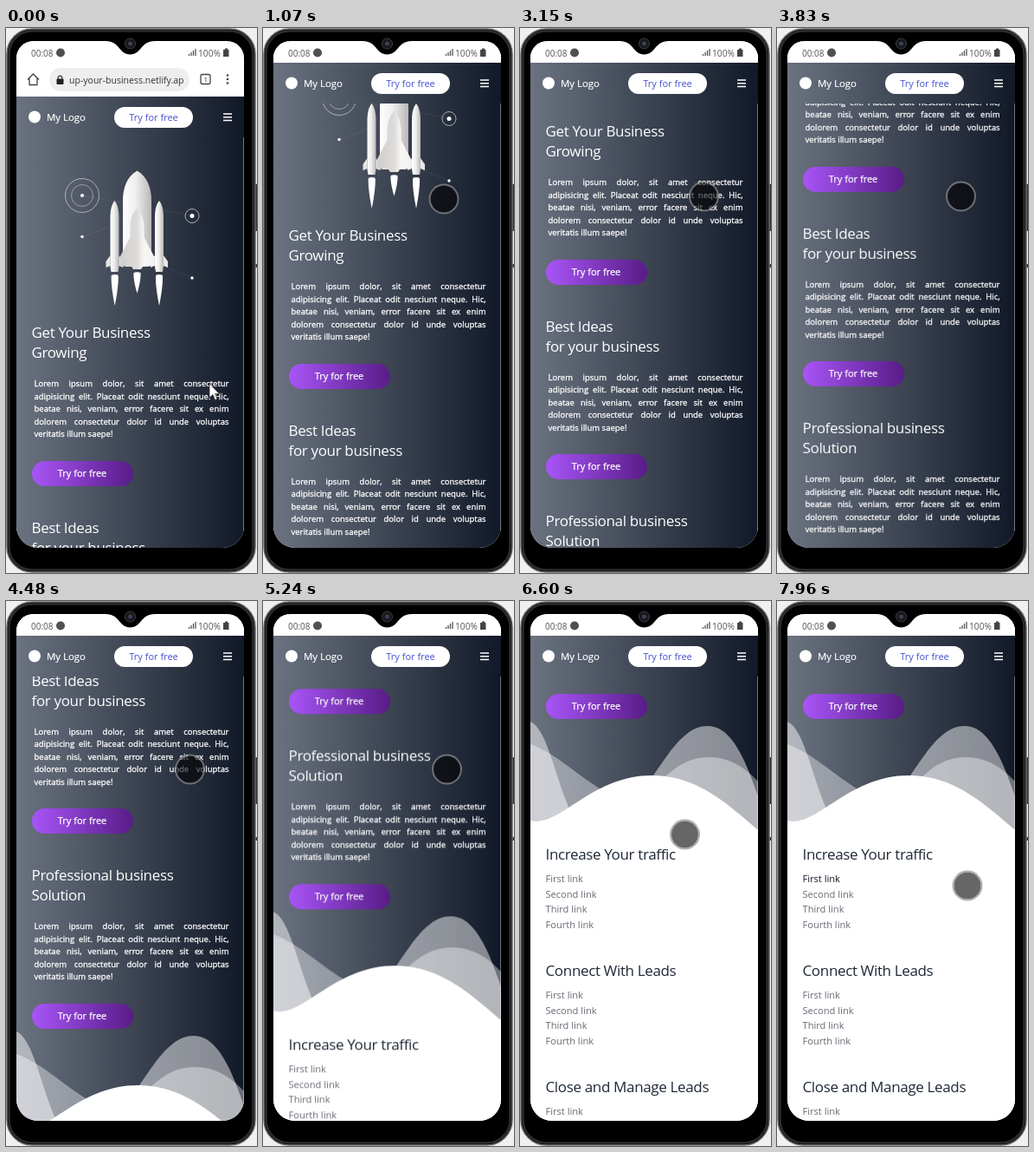
Recreate the animation shown at these times as an HTML page. Size 290x628 px, loop 8000 ms.

```html
<!DOCTYPE html>
<html lang="en">
<head>
<meta charset="utf-8">
<title>Mobile landing page</title>
<style>
html, body { margin: 0; width: 100%; height: 100%; overflow: hidden; background: #f0f0f0; }
body { position: relative; font-family: "Open Sans", "Noto Sans", sans-serif; }
svg { position: absolute; left: 0; top: 0; overflow: visible; }
#screen { position: absolute; left: 12px; top: 15px; width: 263px; height: 584px; overflow: hidden; border-radius: 20px 20px 25px 25px; background: #fff; }
#stage { position: absolute; left: -12px; top: -15px; width: 290px; height: 628px; }
#page, #bars { position: absolute; left: 0; top: 0; width: 290px; will-change: transform; }
.box { position: absolute; }
.night { background: linear-gradient(90deg, #6b7280, #111827); }
.text { position: absolute; height: 20px; line-height: 20px; white-space: nowrap; }
.heading { font-size: 17px; letter-spacing: -.35px; }
.line { width: 225px; font-size: 9.5px; color: #fff; text-align: justify; text-align-last: justify; -webkit-text-stroke: .3px #fff; }
.line.end { text-align-last: left; }
.button { position: absolute; text-align: center; border-radius: 15px; color: #fff; }
.buy { left: 29.5px; width: 117px; height: 29px; line-height: 28px; font-size: 11px; -webkit-text-stroke: .25px #fff; background: linear-gradient(90deg, #a855f7, #581c87); }
.link { color: #666b73; font-size: 11.1px; }
.link.hover { color: #111827; }
#touch { position: absolute; left: -17.5px; top: -17.5px; width: 31px; height: 31px; border: 2px solid rgba(140, 140, 140, .7); border-radius: 50%; background: rgba(0, 0, 0, .6); background-clip: padding-box; }
</style>
</head>
<body>
<svg width="290" height="628">
  <path d="M289 180V234M289 272V276" stroke="#333" stroke-width="2"/>
  <rect x="1" y="1" width="287" height="626" rx="29" fill="#000" stroke="#6a6b6d" stroke-width="1.5"/>
  <rect x="3.5" y="3.5" width="282" height="621" rx="26.5" fill="none" stroke="#2c2d2f" stroke-width="2.5"/>
</svg>

<div id="screen"><div id="stage">
  <div id="page">
    <div class="box night" style="left:12px;top:0;width:263px;height:1120px"></div>
    <div class="box" style="left:274px;top:0;width:1px;height:1120px;background:rgba(255,255,255,.4)"></div>
    <svg width="290" height="1500">
      <defs>
        <linearGradient id="hull"><stop stop-color="#fff"/><stop offset=".45" stop-color="#efeeed"/><stop offset="1" stop-color="#b9b8b7"/></linearGradient>
        <linearGradient id="shuttle"><stop stop-color="#cfcecd"/><stop offset=".5" stop-color="#dddcdb"/><stop offset=".7" stop-color="#f8f7f6"/><stop offset="1" stop-color="#f3f2f1"/></linearGradient>
        <g id="booster">
          <path d="M0 199C4 204 5 211 5 219V275L4 281H-4L-5 275V219C-5 211-4 204 0 199Z" fill="url(#hull)"/>
          <path d="M-5 262L-10 269V276L-5 274ZM5 262L10 269V276L5 274Z" fill="#e8e7e6"/>
        </g>
        <path id="flame" d="M-4 0Q0-2 4 0C4.500 10 2 25 0 35C-2 25-4.500 10-4 0Z" fill="#fff"/>
      </defs>
      <g fill="none" stroke="#fff">
        <path d="M88 193L215 216M88 241L151 216M151 262L215 288" stroke-width=".6" opacity=".12"/>
        <circle cx="88" cy="193" r="19.5" stroke-width=".7" opacity=".75"/>
        <circle cx="88" cy="193" r="12.5" stroke-width=".7" opacity=".6"/>
        <circle cx="215" cy="216.500" r="8" stroke-width=".8" opacity=".75"/>
      </g>
      <g fill="#fff">
        <circle cx="88" cy="193" r="2"/><circle cx="88" cy="240.500" r="1.700"/>
        <circle cx="215" cy="216.500" r="2.500"/><circle cx="215" cy="288" r="1.700"/>
      </g>
      <path d="M151.500 164.500C163 171 168 184 168 199V268L165 275H138L135 268V199C135 184 140 171 151.500 164.500Z" fill="url(#hull)"/>
      <use href="#booster" x="125.500"/><use href="#booster" x="177"/>
      <path d="M151.500 208C157 213 159.500 222 159.500 231V241L171 263V274L158 275L156 278H147L145 275L132 274V263L143.500 241V231C143.500 222 146 213 151.500 208Z" fill="url(#shuttle)"/>
      <use href="#flame" x="125.700" y="285"/><use href="#flame" x="177" y="285"/>
      <use href="#flame" transform="translate(151.500 282) scale(1 .68)"/>
      <g fill="#fff" transform="translate(0 719)">
        <path opacity=".38" d="M12 287C45 298 75 333 110 347C140 350 150 335 165 327C185 308 200 302 219 302C242 302 260 314 275 330V420H12Z"/>
        <path opacity=".48" d="M12 261C32 270 40 325 59 366C80 405 125 365 150 329C175 292 192 266 217 266C246 266 262 310 275 347V420H12Z"/>
        <path d="M12 375C45 384 82 323 152 323C205 323 240 356 275 386V1000H12Z"/>
      </g>
    </svg>
    <div id="copy"></div>
  </div>

  <div id="bars">
    <div class="box" style="left:12px;top:40px;width:263px;height:39px;background:#fff"></div>
    <div class="box" style="left:50px;top:46px;width:162px;height:27px;border-radius:14px;background:#eeeeef"></div>
    <div class="text" style="left:73px;top:49.500px;width:132px;overflow:hidden;font-size:10.5px;color:#333">up-your-business.netlify.app</div>
    <div class="box night" style="left:12px;top:79px;width:263px;height:47px"></div>
    <svg width="290" height="130">
      <g fill="none" stroke="#444" stroke-width="1.300">
        <path d="M25 59.500L31.500 53L38 59.500M27 58V65.500H36V58"/>
        <rect x="225" y="53.500" width="11" height="11" rx="2"/>
        <path d="M60.200 59V57.500A2.300 2.300 0 0 1 64.800 57.500V59"/>
      </g>
      <rect x="58.500" y="58.500" width="8" height="6.500" rx="1" fill="#222"/>
      <g fill="#444"><circle cx="256" cy="54.500" r="1.300"/><circle cx="256" cy="59" r="1.300"/><circle cx="256" cy="63.500" r="1.300"/></g>
      <circle cx="33" cy="102.500" r="7" fill="#fff"/>
      <path d="M251 99H261M251 102.800H261M251 106.600H261" stroke="#fff" stroke-width="1.500"/>
    </svg>
    <div class="text" style="left:228.500px;top:49px;font-size:8px;color:#222">1</div>
    <div class="text" style="left:47px;top:92.500px;font-size:11.400px;color:#fff;-webkit-text-stroke:.2px #fff">My Logo</div>
    <div class="button" style="left:125px;top:91px;width:91px;height:24px;line-height:23px;font-size:11px;background:#fff;color:#4650d0">Try for free</div>
  </div>

  <div class="box" style="left:12px;top:15px;width:263px;height:25px;background:#fff"></div>
  <div class="text" style="left:29px;top:18.500px;font-size:10px;color:#555">00:08</div>
  <div class="text" style="left:222px;top:18.500px;font-size:10.200px;color:#555">100%</div>
  <svg width="290" height="40">
    <circle cx="63" cy="28.500" r="5" fill="#505054"/>
    <path d="M211.500 32V30M214 32V28M216.500 32V26M219 32V24" stroke="#555" stroke-width="1.300"/>
    <path d="M251 25H253V23.500H256V25H257.500V33H251Z" fill="#444"/>
    <path d="M115 14V15C132 15 130 30.500 143.500 30.500C157 30.500 155 15 172 15V14Z"/>
  </svg>
  <div id="touch"></div>
  <svg id="arrow" width="290" height="628"><path d="M235 409.500V426L239 422.500L241.500 428.500L244 427.500L241.500 421.500H246.500Z" fill="#fff" stroke="#222" stroke-width=".7"/></svg>
</div></div>

<svg width="290" height="40">
  <circle cx="143.500" cy="18" r="6" fill="#17181b" stroke="#3d3f43"/>
  <circle cx="143.500" cy="18" r="2.500" fill="#3a4055"/>
</svg>

<script>
const $ = id => document.getElementById(id);
const text = (x, y, str, cls, style = '') =>
  `<div class="text ${cls}" style="left:${x}px;top:${y - 10}px;${style}">${str}</div>`;
const heading = (y, str, color) => text(29.5, y, str, 'heading', `color:${color}`);

const lorem = [
  'Lorem ipsum dolor, sit amet consectetur',
  'adipisicing elit. Placeat odit nesciunt neque. Hic,',
  'beatae nisi, veniam, error facere sit ex enim',
  'dolorem consectetur dolor id unde voluptas',
  'veritatis illum saepe!'
];
const sections = [
  ['Get Your Business', 'Growing'],
  ['Best Ideas', 'for your business'],
  ['Professional business', 'Solution']
];
const columns = ['Increase Your traffic', 'Connect With Leads', 'Close and Manage Leads'];
const ordinals = ['First', 'Second', 'Third', 'Fourth'];

let html = '';
sections.forEach((title, i) => {
  const y = 351 + 224.6 * i;
  title.forEach((str, j) => html += heading(y + 23 * j, str, '#fff'));
  lorem.forEach((str, j) => html += text(32.5, y + 59 + 14.5 * j, str, j < 4 ? 'line' : 'line end'));
  html += `<div class="button buy" style="top:${y + 147.5}px">Try for free</div>`;
});
const linkY = [];
columns.forEach((title, i) => {
  const y = 1133 + 134 * i;
  html += heading(y, title, '#1f2937');
  ordinals.forEach((word, j) => {
    linkY.push(y + 28 + 17.6 * j);
    html += text(29.5, y + 28 + 17.6 * j, word + ' link', 'link');
  });
});
$('copy').innerHTML = html;
const links = document.querySelectorAll('.link');

// Keys: [time, value, ...]
const scrollKeys = [
  [0, 0], [870, 0], [1070, 112], [1820, 112], [2070, 0], [2770, 0], [3150, 232], [3590, 232],
  [3830, 339], [4040, 361], [4280, 361], [4480, 484], [4640, 484], [4860, 601],
  [5190, 601], [5480, 719], [6350, 719], [6600, 841]
];
const touchKeys = [
  [60, 226, 448], [500, 208.5, 196.5], [2150, 208.5, 196.5], [2270, 211.5, 194], [2630, 212, 193.5],
  [5300, 212, 193.5], [5700, 187, 267], [5970, 188, 268], [6040, 190, 268.5], [6680, 190, 268.5],
  [7000, 232, 325], [7250, 234, 364], [7500, 239, 350], [7820, 221, 328.5], [7960, 219.5, 327.5]
];

function sample(keys, t) {
  const i = keys.findIndex(k => k[0] > t);
  if (i <= 0) return keys[i ? keys.length - 1 : 0].slice(1);
  const a = keys[i - 1], b = keys[i], u = (t - a[0]) / (b[0] - a[0]);
  return a.slice(1).map((v, j) => v + (b[j + 1] - v) * u);
}

function draw(now) {
  const t = now % 8000;
  const [scroll] = sample(scrollKeys, t);
  const [x, y] = sample(touchKeys, t);
  $('page').style.transform = `translateY(${-scroll}px)`;
  $('bars').style.transform = `translateY(${-Math.min(39, scroll)}px)`;
  $('touch').style.transform = `translate(${x}px,${y}px)`;
  $('touch').style.visibility = t < 60 ? 'hidden' : 'visible';
  $('arrow').style.visibility = t < 60 ? 'visible' : 'hidden';
  links.forEach((el, i) => el.classList.toggle('hover', Math.abs(y + scroll - linkY[i]) < 8.8));
}

const start = performance.now();
function loop() {
  draw(performance.now() - start);
  requestAnimationFrame(loop);
}
loop();
</script>
</body>
</html>
```
